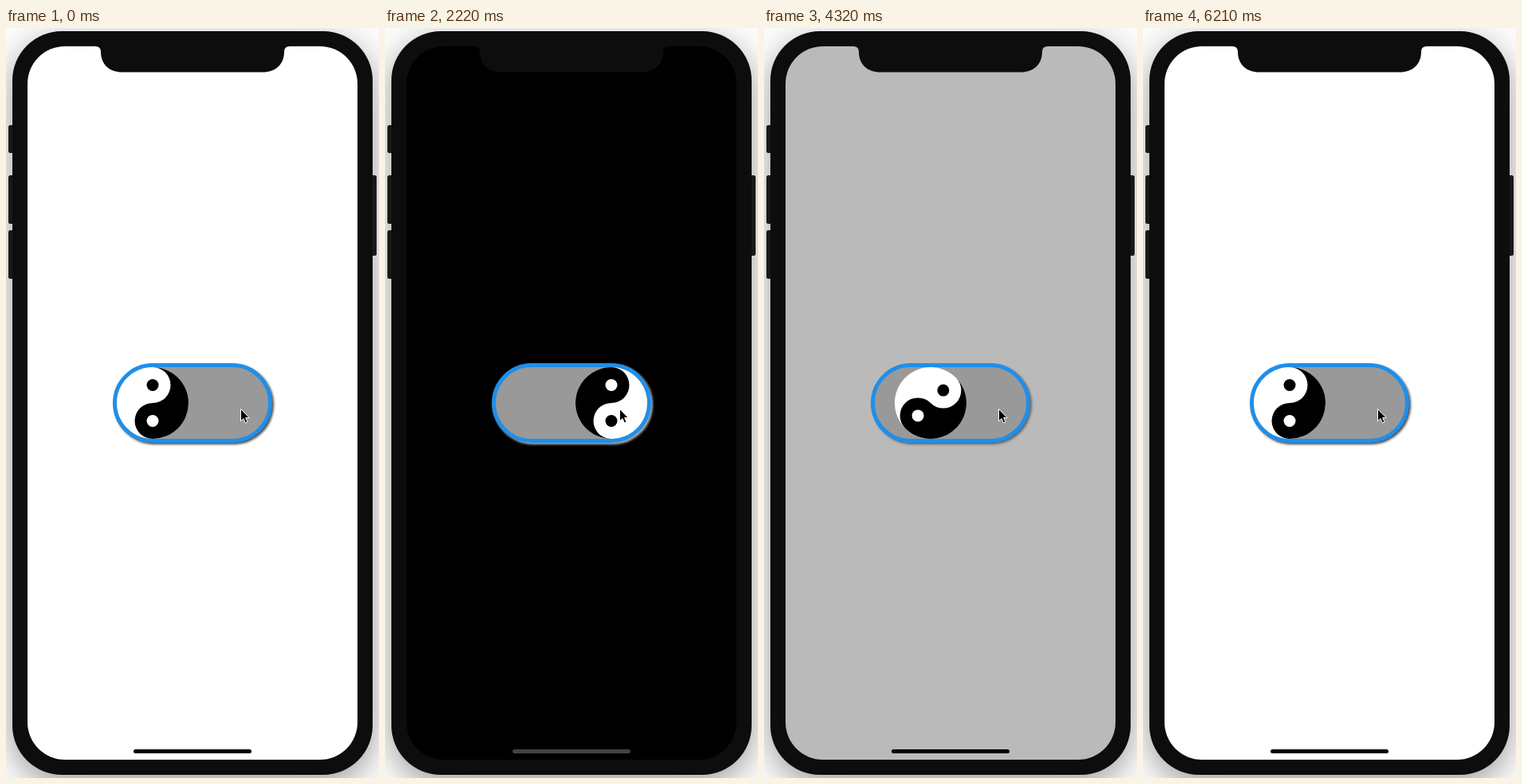
An HTML page that plays this animation: 468 by 942 pixels, repeating every 6.24 s.

```html
<!DOCTYPE html>
<html lang="en">
<head>
<meta charset="utf-8">
<title>Yin-yang switch</title>
<style>
  html, body { margin: 0; width: 100%; height: 100%; overflow: hidden; background: #fcfcfc; }
  svg { display: block; width: 100%; height: 100%; }
</style>
</head>
<body>
<svg viewBox="0 0 468 942" xmlns="http://www.w3.org/2000/svg">
  <defs>
    <filter id="wide" filterUnits="userSpaceOnUse" x="-80" y="-80" width="640" height="1120">
      <feGaussianBlur stdDeviation="20"/>
    </filter>
    <filter id="soft" filterUnits="userSpaceOnUse" x="120" y="405" width="230" height="135">
      <feGaussianBlur stdDeviation="1.6"/>
    </filter>
  </defs>

  <!-- phone -->
  <rect width="468" height="942" fill="#fcfcfc"/>
  <rect x="8" y="16" width="452" height="934" rx="64" opacity=".38" filter="url(#wide)"/>
  <g fill="#191919">
    <rect x="3" y="122" width="9" height="35" rx="2.5"/>
    <rect x="3" y="185" width="9" height="61" rx="2.5"/>
    <rect x="3" y="254" width="9" height="61" rx="2.5"/>
    <rect x="456" y="185" width="9" height="101" rx="2.5"/>
  </g>
  <rect x="8" y="4" width="452" height="934" rx="62" fill="#0d0d0d"/>
  <rect id="screen" x="27" y="23" width="414" height="896" rx="47"/>
  <path fill="#0d0d0d" d="M112 22.5V23Q119 23 119 30C119 46 130 55.5 146 55.5H322C338 55.5 349 46 349 30Q349 23 356 23V22.5Z"/>
  <rect id="home" x="160" y="906" width="148" height="5" rx="2.5"/>

  <!-- switch -->
  <rect id="shadow" x="136" y="423" width="200" height="100" rx="50" opacity=".7" filter="url(#soft)"/>
  <rect x="136.5" y="423.5" width="195" height="95" rx="47.5" fill="#999" stroke="#1f8fea" stroke-width="5"/>
  <g id="disc">
    <circle r="45" fill="#fff"/>
    <path d="M0-45A45 45 0 0 1 0 45A22.5 22.5 0 0 1 0 0A22.5 22.5 0 0 0 0-45Z"/>
    <circle cy="-22.5" r="7.5"/>
    <circle cy="22.5" r="7.5" fill="#fff"/>
  </g>

  <path d="M294.5 478.5V493.8L298 490.6L300.4 496L303 494.9L300.6 489.6H305.2Z" stroke="#fff" stroke-width="1" stroke-linejoin="round"/>
</svg>
<script>
  const LOOP = 6240, STEP = 30, DURATION = 200;
  const toDark = [360, 4270];
  const toLight = [2663, 5870];

  const el = id => document.getElementById(id);
  const [screen, home, shadow, disc] = ['screen', 'home', 'shadow', 'disc'].map(el);
  const clamp = v => Math.min(1, Math.max(0, v));
  const gray = v => {
    const n = Math.round(255 * v);
    return `rgb(${n},${n},${n})`;
  };

  // 0 = light, knob left; 1 = dark, knob right
  function darkness(t) {
    const sum = starts => starts.reduce((s, at) => s + clamp((t - at) / DURATION), 0);
    return clamp(sum(toDark) - sum(toLight));
  }

  function draw(t) {
    const k = darkness(t);
    screen.setAttribute('fill', gray((1 - k) ** 1.1));
    home.setAttribute('fill', gray(0.265 * clamp((k - 0.4) / 0.6)));
    shadow.setAttribute('fill', gray(k));
    disc.setAttribute('transform', `translate(${184 + 100 * k} 471) rotate(${180 * k})`);
  }

  function tick() {
    const t = performance.now() % LOOP;
    draw(Math.floor((t + 1) / STEP) * STEP);
    requestAnimationFrame(tick);
  }
  tick();
</script>
</body>
</html>
```
